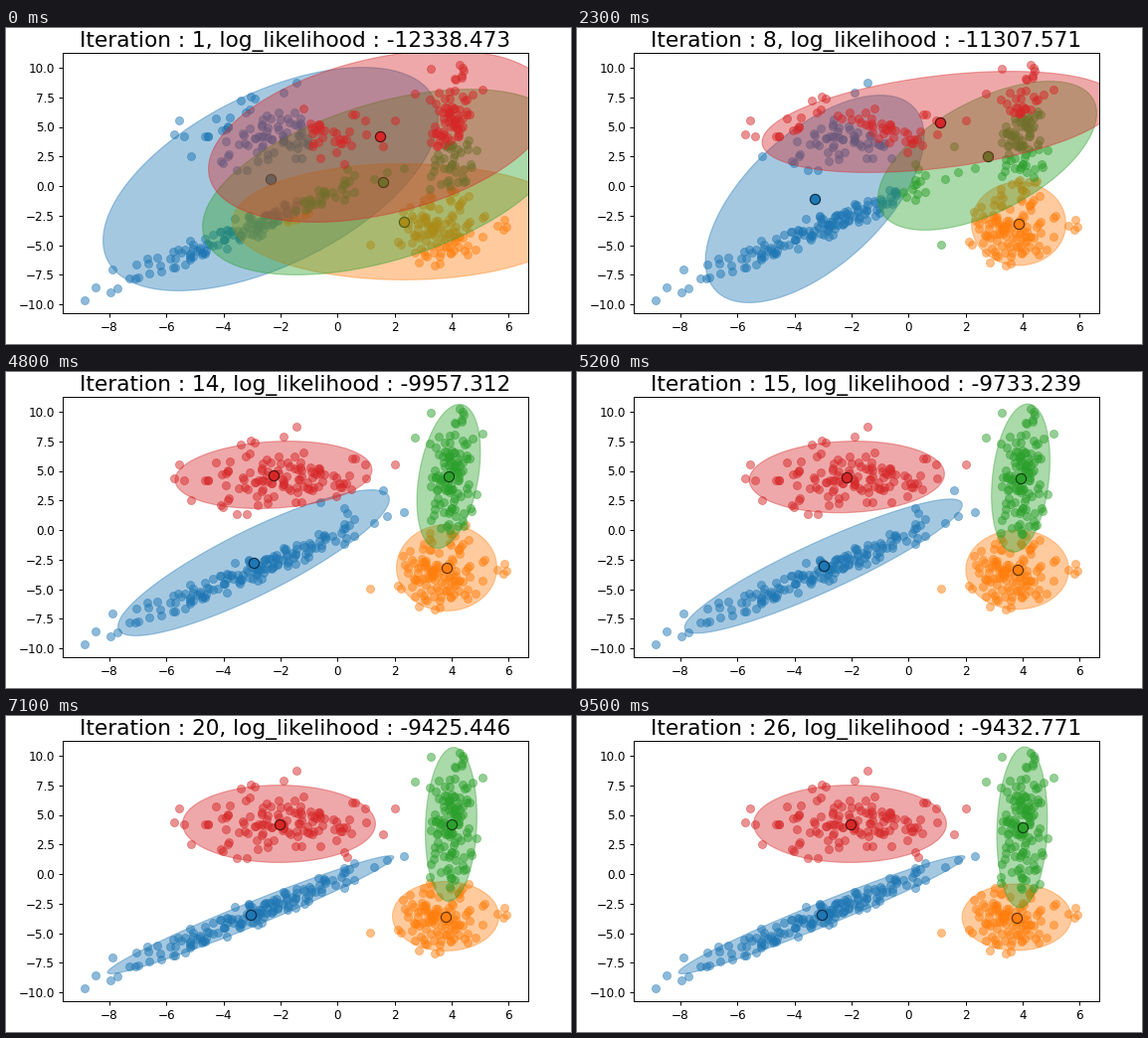
A matplotlib script that plays this animation: 568x318 px, repeating every 10 s.

```python
import numpy as np
import matplotlib.pyplot as plt
from matplotlib.animation import FuncAnimation

W, H, DPI = 568, 318, 64
PT = 86.4 / DPI                              # point scale of all line and font sizes
REACH = np.sqrt(-2 * np.log(.1))             # ellipses enclose 90 % of a Gaussian
X0, Y0, XU, YU = 333.4, 159.0, 28.66, 11.9   # stage origin and pixels per unit
LEFT, RIGHT, TOP, BOTTOM = 56.7, 524.9, 25.0, 287.4
EDGE = .6                                    # outer half of an ellipse outline

# Key poses, iteration -> centre x, y, half width, half height (px), correlation
CLUSTERS = {
    "tab:blue": {1: (266, 152, 169, 113, .55), 8: (239, 172, 110.5, 105, .6),
                 14: (249, 192, 137, 74, .87), 20: (246, 200, 144.5, 60, .976)},
    "tab:orange": {1: (400, 195, 173, 59, 0), 8: (444, 197, 48, 42.5, 0),
                   14: (443, 197, 51, 44, 0), 20: (442, 201.5, 54, 35.5, 0),
                   26: (442, 202.5, 55.5, 34, 0)},
    "tab:green": {1: (379, 155, 182, 94, .48), 8: (412.5, 128.5, 110.5, 75.5, .57),
                  14: (445, 105, 32.5, 73, .34), 20: (447.5, 109, 26.5, 78, .1),
                  26: (447.5, 112, 26, 81.5, .1)},
    "tab:red": {1: (376, 109, 173, 87, .38), 8: (364.5, 94.5, 179, 51.5, .4),
                14: (269, 103.5, 99.5, 34.5, .15), 20: (274.5, 108.5, 97.5, 39.5, 0)},
}
LIKELIHOOD = {1: (-12338.473,), 8: (-11307.571,), 14: (-9957.312,),
              20: (-9425.446,), 26: (-9432.771,)}
STRAYS = [(79, 274), (90, 261), (105, 266), (107, 243), (292, 55), (169, 107),
          (391, 93), (411, 66), (427, 41), (479, 62), (366, 218), (503, 200)]
COUNTS = (150, 108, 122, 118)

ITERATIONS = [*range(1, 9), *range(10, 27)]
STARTS = [0, 2, 5, 9, 13, 16, 20, 23, 31, 36, 40, 43, 48, 52, 55, 58, 63, 67,
          71, 75, 78, 83, 87, 91, 95]        # tenths of a second
BLANKS = {12, 51, 62, 66, 94}


def tween(keys, t):
    """Values at t; the early and the late phase slow down towards their end."""
    times = list(keys)
    t = min(t, times[-1])
    i = min(np.searchsorted(times, t, side="right"), len(times) - 1)
    a, b = times[i - 1], times[i]
    s = (t - a) / (b - a)
    if a in (1, 14):
        s = 1 - (1 - s) ** 3
    return (1 - s) * np.array(keys[a]) + s * np.array(keys[b])


def gaussian(keys, iteration):
    """Centre, half extents and correlation in data units."""
    cx, cy, hw, hh, rho = tween(keys, iteration)
    return (cx - X0) / XU, (Y0 - cy) / YU, (hw - EDGE) / XU, (hh - EDGE) / YU, rho


def place(g, radius, angle):
    cx, cy, hw, hh, rho = g
    u, v = radius * np.cos(angle), radius * np.sin(angle)
    return np.column_stack([cx + hw * u, cy + hh * (rho * u + np.sqrt(1 - rho**2) * v)])


def make_points():
    rng = np.random.default_rng(7)
    x, y = np.array(STRAYS).T
    parts = [np.column_stack([(x - X0) / XU, (Y0 - y) / YU])]
    for keys, n in zip(CLUSTERS.values(), COUNTS):
        radius = np.sqrt(-2 * np.log(1 - .95 * rng.random(n))) / REACH
        parts.append(place(gaussian(keys, 26), radius, rng.uniform(0, 2 * np.pi, n)))
    return np.vstack(parts)


def density(g, points):
    cx, cy, hw, hh, rho = g
    u, v = (points[:, 0] - cx) / hw, (points[:, 1] - cy) / hh
    q = (u * u + v * v - 2 * rho * u * v) / (1 - rho**2)
    return np.exp(-.5 * REACH**2 * q) / (hw * hh * np.sqrt(1 - rho**2)) + 1e-300


def assign(models, points, iteration):
    """Most probable cluster of each point; mixing weights start out equal."""
    dens = np.array([density(g, points) for g in models])
    weights = np.full(len(models), 1 / len(models))
    for _ in range(min(iteration - 1, 4)):
        resp = weights[:, None] * dens
        weights = (resp / resp.sum(axis=0)).mean(axis=1)
    return np.argmax(weights[:, None] * dens, axis=0)


POINTS = make_points()
THETA = np.linspace(0, 2 * np.pi, 181)

fig = plt.figure(figsize=(W / DPI, H / DPI), dpi=DPI, facecolor="white")
ax = fig.add_axes([LEFT / W, 1 - BOTTOM / H, (RIGHT - LEFT) / W, (BOTTOM - TOP) / H])
ax.set_xlim((LEFT - X0) / XU, (RIGHT - X0) / XU)
ax.set_ylim((Y0 - BOTTOM) / YU, (Y0 - TOP) / YU)
ax.set_xticks(np.arange(-8, 7, 2))
ax.set_yticks(np.arange(-10, 10.1, 2.5))
ax.tick_params(labelsize=10 * PT, length=3.5 * PT, width=.8 * PT, pad=3 * PT)
for spine in ax.spines.values():
    spine.set_linewidth(.8 * PT)
title = ax.set_title("", fontsize=18 * PT, pad=4.8 * PT, y=1)

layers = []
for i, color in enumerate(CLUSTERS):
    z = 1 + i / 10
    dots = ax.scatter([], [], s=46 * PT**2, color=color, alpha=.5,
                      linewidths=.6 * PT, zorder=z)
    mean = ax.scatter([], [], s=72 * PT**2, facecolor=color, edgecolor="black",
                      linewidths=PT, zorder=z + .02)
    ellipse, = ax.fill([0, 1, 1], [0, 0, 1], color=color, alpha=.4,
                       linewidth=PT, zorder=z + .04)
    layers.append((dots, mean, ellipse))


def update(frame):
    ax.set_visible(frame not in BLANKS)
    step = np.searchsorted(STARTS, frame, side="right") - 1
    iteration = ITERATIONS[step]
    likelihood, = tween(LIKELIHOOD, iteration)
    title.set_text(f"Iteration : {iteration}, log_likelihood : {likelihood:.3f}")
    models = [gaussian(keys, iteration) for keys in CLUSTERS.values()]
    labels = assign(models, POINTS, iteration)
    for i, (dots, mean, ellipse) in enumerate(layers):
        dots.set_offsets(POINTS[labels == i])
        mean.set_offsets([models[i][:2]])
        ellipse.set_xy(place(models[i], 1, THETA))
    return []


anim = FuncAnimation(fig, update, frames=100, interval=100, repeat=True,
                     repeat_delay=0, blit=False)
plt.show()
```
